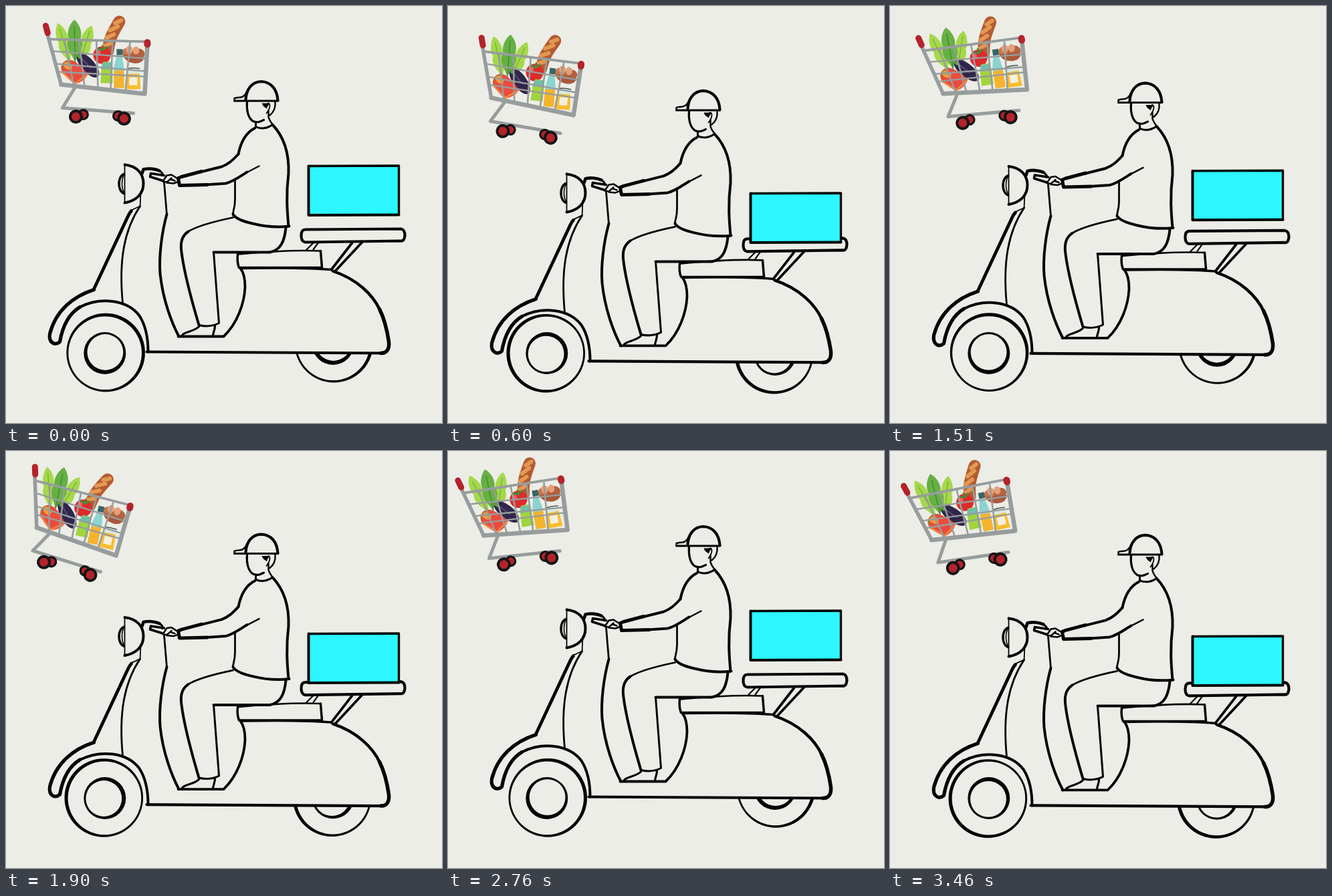
These frames come from a looping animation (652x624 px, 3.49 s). An HTML page with a canvas:

```html
<!DOCTYPE html>
<html lang="en">
<head>
<meta charset="utf-8">
<title>Grocery scooter</title>
<style>
html, body { margin: 0; width: 100%; height: 100%; overflow: hidden; background: #ecede6; }
canvas { display: block; }
</style>
</head>
<body>
<canvas id="stage" width="652" height="624"></canvas>
<script>
const ctx = document.getElementById('stage').getContext('2d');
const LOOP = 3490, TAU = Math.PI * 2;
const INK = '#050505', GREY = '#979d9d', RED = '#b3232b';

// [seconds, height]: turning points of the suspension, 0 = up, 1 = down
const rideKeys = [[0, 0], [.66, 1], [1.27, 0], [2.15, 1], [2.76, 0], [2.88, 0], [3.6, 1]];

// [seconds, x, y, degrees]
const cartKeys = [
  [0, 135, 95, 2.4], [.3, 112, 97, -8], [.6, 119, 120, 7.9], [.87, 122, 131, -5],
  [1.14, 127, 144.6, 4.8], [1.5, 128, 101, -7], [1.9, 102, 104.6, 15.4],
  [2.2, 112, 90, 0], [2.48, 119.4, 110, -9.5], [2.8, 99, 94, -7],
  [3.09, 95, 105.6, 6.3], [3.46, 108.6, 99.6, -10.2], [3.6, 111, 100, -12]
];

// Width and path of each pen line of rider and scooter
const lines = [
  // cap and head
  [4.2, 'M358 139C359 124 367 113 381 112.5C396 113 405 124 406 141'],
  [3, 'M406 141.5H341'],
  [2.4, 'M341 141V137.5L346 136.5C354 137 357 133 360 127'],
  [3.2, 'M360 143C359 154 361 167 369 172C376 175 381 172 385 170'],
  [2.4, 'M402 143C403 152 399 159 394 163M392 156V166C394 172 397 175 399 178'],
  [1.8, 'M389 152C388 146 393 142 394 148C394 154 391 157 389 160'],
  [3, 'M373 173V180C380 184 390 183 398 177'],
  // torso and arms
  [4, 'M398 177C416 196 423 222 422 250C418 282 420 307 422 329'],
  [4, 'M339 311C342 317 355 322 368 325C388 330 405 331 423 329'],
  [2.8, 'M342 261V289C342 304 338 307 339 312'],
  [4, 'M372 182C356 190 350 206 347 221'],
  [4, 'M347 221C338 231 332 236 322 240L290 248'],
  [5, 'M292 247L262 255L257 257L259 268L300 267'],
  [4, 'M298 267L328 265C340 262 350 254 360 248'],
  [2.5, 'M355 251L378 239'],
  [2.5, 'M258 259L247 252L240 253L234 262L240 263L247 257M240 264L250 265L258 262M246 259L252 261'],
  [3.6, 'M236 253L216 250L215 255L234 261'],
  // handlebar, lamp and stem
  [4.6, 'M203 250L205 244C212 242 222 243 229 246'],
  [3, 'M229 246C233 249 235 251 233 253'],
  [1.8, 'M177 236V294M201 277L200 300'],
  [4, 'M177 237C195 239 205 250 205 265C205 281 194 291 177 294'],
  [3.6, 'M176 251C166 255 166 276 176 280'],
  [1.6, 'M176 252C172 259 172 272 176 278'],
  [2.8, 'M236 264L240 312'],
  [4, 'M240 311C232 340 228 375 230 400C234 440 248 475 258 494'],
  [3.8, 'M257 494H325C345 475 356 445 357 420C357 405 354 397 350 392'],
  // front shield and mudguard
  [4.8, 'M187 306C184 309 183 312 181 316L131 423'],
  [1.8, 'M187 305L200 299'],
  [2.8, 'M200 299C176 335 168 380 174 444'],
  [5.2, 'M131 424C100 434 74 455 65 490C63 504 73 508 80 502C83 485 90 462 110 450'],
  [4, 'M110 450C140 435 180 438 199 463C208 477 212 495 212 517'],
  // legs and shoe
  [2.8, 'M339 316C310 322 285 329 272 337'],
  [4, 'M272 337C262 344 260 354 262 368C266 400 280 450 288 477'],
  [3, 'M288 477C300 480 310 478 318 474L310 368'],
  [4, 'M310 368H394C410 365 416 352 418 331'],
  [3.2, 'M289 478C284 486 266 487 263 492M312 478C312 485 309 488 309 493'],
  // seat
  [3.5, 'M346 371C345 380 346 386 348 391C390 391 435 391 471 391M470 366L472 391'],
  [2.6, 'M347 371C390 367 430 364 470 366'],
  [3.5, 'M350 392C400 391 450 391 486 394'],
  // rack and struts
  [4.2, 'M447 334L590 333Q596 334 596 343Q595 352 590 351L447 353Q441 352 441 343Q441 334 447 334Z'],
  [3.8, 'M517 354L486 394M532 353L491 397'],
  [2.2, 'M459 354L449 364M467 353L459 364'],
  // rear shell
  [4.2, 'M210 517L565 519'],
  [5.5, 'M560 519C569 519 573 513 572 502C569 482 565 467 558 453'],
  [4.4, 'M559 455C548 431 524 408 488 396']
].map(([width, d]) => [width, new Path2D(d)]);

function stroke(path, width, color = INK) {
  ctx.strokeStyle = color;
  ctx.lineWidth = width;
  ctx.stroke(typeof path === 'string' ? new Path2D(path) : path);
}

function fill(d, color) {
  ctx.fillStyle = color;
  ctx.fill(new Path2D(d));
}

function oval(x, y, rx, ry, color, turn = 0) {
  ctx.fillStyle = color;
  ctx.beginPath();
  ctx.ellipse(x, y, rx, ry, turn, 0, TAU);
  ctx.fill();
}

function ride(t) {
  const i = rideKeys.findIndex(k => k[0] > t);
  const [t0, a] = rideKeys[i - 1], [t1, b] = rideKeys[i];
  return a + (b - a) * (.5 - .5 * Math.cos(Math.PI * (t - t0) / (t1 - t0)));
}

// Smooth cubic through the cart poses
function cartPose(t) {
  const i = cartKeys.findIndex(k => k[0] > t);
  const key = n => cartKeys[Math.max(0, Math.min(cartKeys.length - 1, n))];
  const [p, a, b, q] = [key(i - 2), key(i - 1), key(i), key(i + 1)];
  const h = b[0] - a[0], s = (t - a[0]) / h;
  return [1, 2, 3].map(c => {
    const m0 = (b[c] - p[c]) / (b[0] - p[0]) * h;
    const m1 = (q[c] - a[c]) / (q[0] - a[0]) * h;
    const d = b[c] - a[c];
    return a[c] + s * (m0 + s * (3 * d - 2 * m0 - m1 + s * (m0 + m1 - 2 * d)));
  });
}

// Ring whose hole is off centre, so the line swells on one side
function ring(x, y, radius, width, swell, angle) {
  const r = radius - width;
  ctx.fillStyle = INK;
  ctx.beginPath();
  ctx.arc(x, y, radius, 0, TAU);
  ctx.arc(x - swell * Math.cos(angle), y - swell * Math.sin(angle), r, 0, TAU, true);
  ctx.fill('evenodd');
}

function wheel(x, y, spin) {
  ring(x + 1.6 * Math.cos(spin), y + 1.6 * Math.sin(spin), 58.8, 4, 1.2, spin);
  ring(x, y, 31.5, 4.6, 1.6, spin + 2.5);
}

function leaf(x, y, tilt, length, width, color, vein) {
  ctx.save();
  ctx.translate(x, y);
  ctx.rotate(tilt);
  fill(`M0 0C${-width * .3} ${-length * .2} ${-width * 1.3} ${-length * .35} ${-width * .7} ${-length * .55}
    C${-width} ${-length * .7} ${-width * .6} ${-length * .9} 0 ${-length}
    C${width * .6} ${-length * .9} ${width} ${-length * .7} ${width * .7} ${-length * .55}
    C${width * 1.3} ${-length * .35} ${width * .3} ${-length * .2} 0 0`, color);
  stroke(`M0 0V${-length * .85}`, 1.2, vein);
  ctx.restore();
}

function groceries() {
  leaf(96, 86, -.3, 64, 10.5, '#a5d84b', '#6eae37');
  leaf(109, 86, .31, 60, 10.5, '#a5d84b', '#6eae37');
  leaf(103, 84, -.02, 64, 12.5, '#66b044', '#3c8332');

  stroke('M152 67Q154 50 160 39T169 23', 18, '#b45b32');
  stroke('M147 59L157 55M150 47L161 42M155 36L167 30M163 25L172 21', 6, '#e29850');

  oval(182, 69, 9, 7, '#c9774e');
  oval(197, 71, 10, 8, '#b4623f');
  oval(184, 65, 5, 6, '#e3a07a');
  oval(194, 66, 5, 6, '#e3a07a');
  fill('M174 72L207 76Q203 87 190 85Q177 83 174 72', '#a9583a');

  oval(143, 73, 13, 13, '#df2a2c');
  oval(138, 69, 3, 4, '#f0645a');
  stroke('M137 63L144 66L150 61M144 66V59', 2.5, '#478c35');

  oval(122, 88, 10, 23, '#30264b', -.72);
  stroke('M112 77L126 92', 2, '#5a4a78');
  stroke('M105 71L110 76', 5, '#5f9a42');

  oval(94, 92, 12, 12, '#b96a2b', .5);
  fill('M83 97Q86 83 100 81Q114 90 122 102Q116 113 103 116Q91 109 83 97', '#ec4b3c');
  oval(92, 89, 7, 5, '#f29a3f', .6);
  stroke('M84 99L103 115L120 103', 2.5, '#f0873c');

  fill('M142 91L145 83H156L159 91V115H141Z', '#a0d53c');
  fill('M144 84H157L159 94H142Z', '#6fbfa9');
  fill('M161 91L165 74H173L176 91V122H161Z', '#8bd4d2');
  fill('M161 96H176V122H161Z', '#f6b32d');
  fill('M165 64H174V73H165Z', '#35666a');
  fill('M180 99H199L201 124H179Z', '#f8bd2c');
  fill('M181 93H199V101H181Z', '#d9e9e2');
  fill('M184 106H196V118H184Z', '#f4efe0');
  stroke('M178 95Q184 91 199 93', 1.5, '#4d5557');
}

function cartWheel(x, y, r) {
  oval(x, y, r, r, '#151515');
  oval(x, y, r * .62, r * .62, RED);
}

function cart([x, y, degrees]) {
  ctx.save();
  ctx.translate(x, y);
  ctx.rotate((degrees - 2.4) * Math.PI / 180);
  ctx.translate(-135, -95);
  groceries();
  stroke('M87 51L101 118M109 52L117 120M135 53L137 122M159 54L156 125M185 55L178 128', 2.6, GREY);
  stroke('M69 67L209 78M75 86L208 97M79 98L207 105', 2.4, GREY);
  stroke('M64 49L211 53', 3.8, GREY);
  stroke('M103 121L84 152L190 160', 5, GREY);
  stroke('M62 43L82 117', 5.5, GREY);
  stroke('M82 117L207 131L211 58', 6.5, GREY);
  stroke('M59 29L62 40', 9, RED);
  stroke('M211 54V57', 10, RED);
  cartWheel(115, 162, 8.5);
  cartWheel(167, 164, 8.5);
  cartWheel(104, 165, 10.5);
  cartWheel(176, 168, 10.5);
  ctx.restore();
}

function scooter(t) {
  const drop = ride(t);
  const spin = -TAU * (.09 + .715 * t);
  wheel(147.3, 519, spin);

  ctx.save();
  ctx.translate(0, 14.2 * drop);
  ctx.save();
  ctx.beginPath();
  ctx.rect(400, 518, 180, 90);
  ctx.clip();
  wheel(488.5, 505 + 2 * drop, spin);
  ctx.restore();
  for (const [width, path] of lines) stroke(path, width);
  fill('M382 145H394L389 152Q384 151 382 145', INK);
  ctx.restore();

  ctx.save();
  ctx.translate(0, 41.8 * drop);
  fill('M452 239H587V312H452Z', '#2cf6ff');
  stroke('M452 239L587 238.5V312', 3.4);
  stroke('M452 239V312.5L587 312', 4);
  ctx.restore();
}

function frame(now) {
  const t = now % LOOP / 1000;
  ctx.fillStyle = '#ecede6';
  ctx.fillRect(0, 0, 652, 624);
  ctx.lineCap = ctx.lineJoin = 'round';
  ctx.save();
  ctx.translate(.5, .5);
  cart(cartPose(t));
  scooter(t);
  ctx.restore();
}

const start = performance.now();
function tick() {
  frame(performance.now() - start);
  requestAnimationFrame(tick);
}
tick();
</script>
</body>
</html>
```
